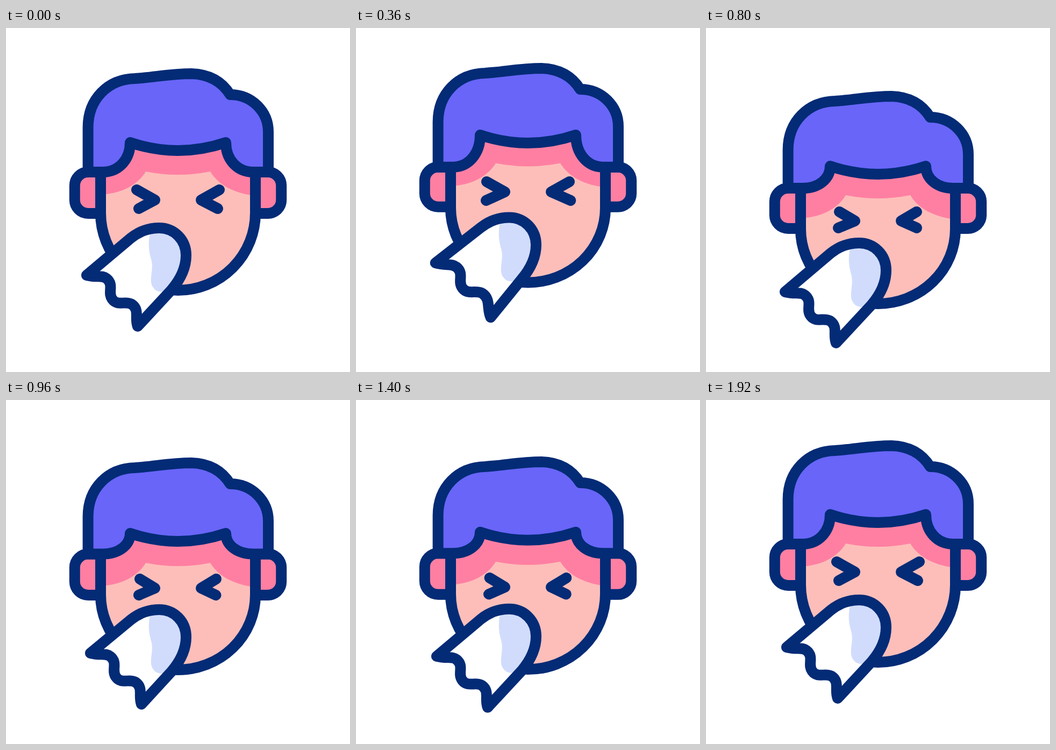
Animation, 640 px wide and 640 px high, one loop 2000 ms. Source, as an HTML page:

```html
<!DOCTYPE html>
<html lang="en">
<head>
<meta charset="utf-8">
<title>Sneeze</title>
<style>
  html, body { margin: 0; width: 100%; height: 100%; overflow: hidden; background: #fff; }
  svg { display: block; width: 100%; height: 100%; }
  .line { stroke: #042b76; stroke-width: 20; stroke-linecap: round; stroke-linejoin: round; }
</style>
</head>
<body>
<svg viewBox="0 0 640 640" fill="none">
  <path id="earL" class="line" fill="#ff7fa2"/>
  <path id="earR" class="line" fill="#ff7fa2"/>
  <path id="skin" fill="#fdbeb9"/>
  <path id="shade" fill="#ff7fa2"/>
  <path id="jaw" class="line"/>
  <path id="hair" class="line" fill="#6865f8"/>
  <path id="eyeL" class="line"/>
  <path id="eyeR" class="line"/>
  <path id="tissue" fill="#fff"/>
  <path id="fold" fill="#d1dcfd"/>
  <path id="tissueLine" class="line"/>
</svg>
<script>
const LOOP = 2000, STEP = 40;

const NAMES = ["top", "base", "lobe", "chin", "fringe", "shade", "eye",
  "upX", "lowX", "lowRightX", "upY", "lowY", "tissue", "spread", "stretch"];
const pose = (...values) => Object.fromEntries(NAMES.map((n, i) => [n, values[i]]));

const rest   = pose(0, 0, 0, 0, 0, 0, 0, 243, 247, 394, -19, 16, 0, 0, 0);
const inhale = pose(-18, -16.5, -22, -26, -25, -28, -27, 243, 238, 403.5, -19, 16, -35, 1, 0);
const sneeze = pose(47.6, 36.5, 33.6, 31.2, 49, 48.5, 44, 247.5, 245.5, 393, -17, 13, 33.6, 0, 8.6);
const recoil = pose(32, 18.5, 18, 14, 35, 36, 30, 249, 247, 390.5, -17, 13, 18, 0, -7);
const settle = { ...recoil, stretch: 0 };

const smooth = u => u * u * (3 - 2 * u);
const speedUp = u => u * u;
const slowDown = u => 1 - (1 - u) ** 2;

const keys = [
  { at: 80, pose: rest },
  { at: 600, pose: inhale, ease: smooth },
  { at: 760, pose: sneeze, ease: speedUp },
  { at: 960, pose: recoil, ease: slowDown },
  { at: 1320, pose: settle, ease: smooth },
  { at: 1840, pose: rest, ease: smooth }
];

function poseAt(t) {
  const i = keys.findIndex(k => t < k.at);
  if (i < 1) return rest;
  const a = keys[i - 1], b = keys[i];
  const u = b.ease((t - a.at) / (b.at - a.at));
  return pose(...NAMES.map(n => a.pose[n] + (b.pose[n] - a.pose[n]) * u));
}

const draw = (id, d) => document.getElementById(id).setAttribute("d", d);

function drawHead(p) {
  const base = 268 + p.base, lobe = 345 + p.lobe;
  const jawY = 344 + p.base, jawDepth = 488 + p.chin - jawY;

  const ear = (x, sweep) => {
    const edge = x(127.8), bend = x(152.8);
    return `M${x(176)} ${base}H${bend}A25 25 0 0 ${sweep} ${edge} ${base + 25}
      V${lobe - 25}A25 25 0 0 ${sweep} ${bend} ${lobe}H${x(176)}`;
  };
  draw("earL", ear(x => x, 0));
  draw("earR", ear(x => 640 - x, 1));

  const jaw = y => `M176 ${y}V${jawY}A144 ${jawDepth} 0 0 0 464 ${jawY}V${y}`;
  draw("skin", jaw(200 + p.fringe) + "Z");
  draw("jaw", jaw(base));

  const s = y => y + p.shade;
  draw("shade", `M176 ${200 + p.fringe}V${s(310)}
    C215 ${s(308)} 245 ${s(292)} 260 ${s(267)}
    Q320 ${s(279)} 380 ${s(267)}
    C395 ${s(292)} 425 ${s(308)} 464 ${s(312)}V${200 + p.fringe}Z`);

  const h = y => y + p.top, tip = 213 + p.fringe;
  const bend = tip + (base - tip) * 0.59;
  draw("hair", `M152.6 ${base}V${h(185)}
    C152.6 ${h(132)} 190 ${h(95)} 240 ${h(94)}
    C275 ${h(92)} 305 ${h(85)} 345 ${h(85)}
    C378 ${h(86)} 402 ${h(100)} 417 ${h(124)}
    C458 ${h(124)} 488 ${h(156)} 488 ${h(193)}
    V${base}H460C431 ${base} 409 ${bend} 409 ${tip}
    Q320 ${tip + 30} 231 ${tip}
    C231 ${bend} 209 ${base} 180 ${base}Z`);

  const eyeY = 320 + p.eye;
  const eye = (upX, tipX, lowX) =>
    `M${upX} ${eyeY + p.upY}L${tipX} ${eyeY}L${lowX} ${eyeY + p.lowY}`;
  draw("eyeL", eye(p.upX, 277, p.lowX));
  draw("eyeR", eye(640 - p.upX, 363, p.lowRightX));
}

function drawTissue(p) {
  const g = y => y + p.tissue;
  // Points on the torn edge follow the two tips; w runs from left tip to bottom tip.
  const torn = (x, y, w) => {
    const dx = (14 * w - 4) * p.spread - p.stretch;
    const dy = (11 * w - 6) * p.spread + p.stretch;
    return `${x + dx} ${g(y) + dy} `;
  };
  const dome = `C248 ${g(378)} 264 ${g(372)} 285 ${g(372)}
    C313 ${g(372)} 335 ${g(394)} 335 ${g(423)}
    C335 ${g(447)} 325 ${g(467)} 308 ${g(487)}`;
  const outline = `M${torn(150, 460, 0)}L232 ${g(391)}${dome}L${torn(245, 555, 1)}
    C${torn(239, 540, 0.8)}${torn(249, 524, 0.55)}${torn(234, 514, 0.45)}
    C${torn(222, 507, 0.4)}${torn(208, 518, 0.35)}${torn(198, 505, 0.3)}
    C${torn(188, 492, 0.3)}${torn(202, 478, 0.3)}${torn(187, 466, 0.25)}
    C${torn(178, 459, 0.2)}${torn(170, 465, 0.1)}${torn(150, 460, 0)}Z`;
  draw("tissue", outline);
  draw("tissueLine", outline);
  draw("fold", `M270 ${g(372)}C263 ${g(400)} 266 ${g(415)} 270 ${g(430)}
    C276 ${g(450)} 264 ${g(470)} 274 ${g(483)}
    Q279 ${g(491)} 290 ${g(491)}L308 ${g(487)}
    C325 ${g(467)} 335 ${g(447)} 335 ${g(423)}
    C335 ${g(394)} 313 ${g(372)} 285 ${g(372)}Z`);
}

function render(ms) {
  const p = poseAt(Math.floor((ms % LOOP) / STEP) * STEP);
  drawHead(p);
  drawTissue(p);
}

const start = performance.now();
function tick() {
  render(performance.now() - start);
  requestAnimationFrame(tick);
}
tick();
</script>
</body>
</html>
```
